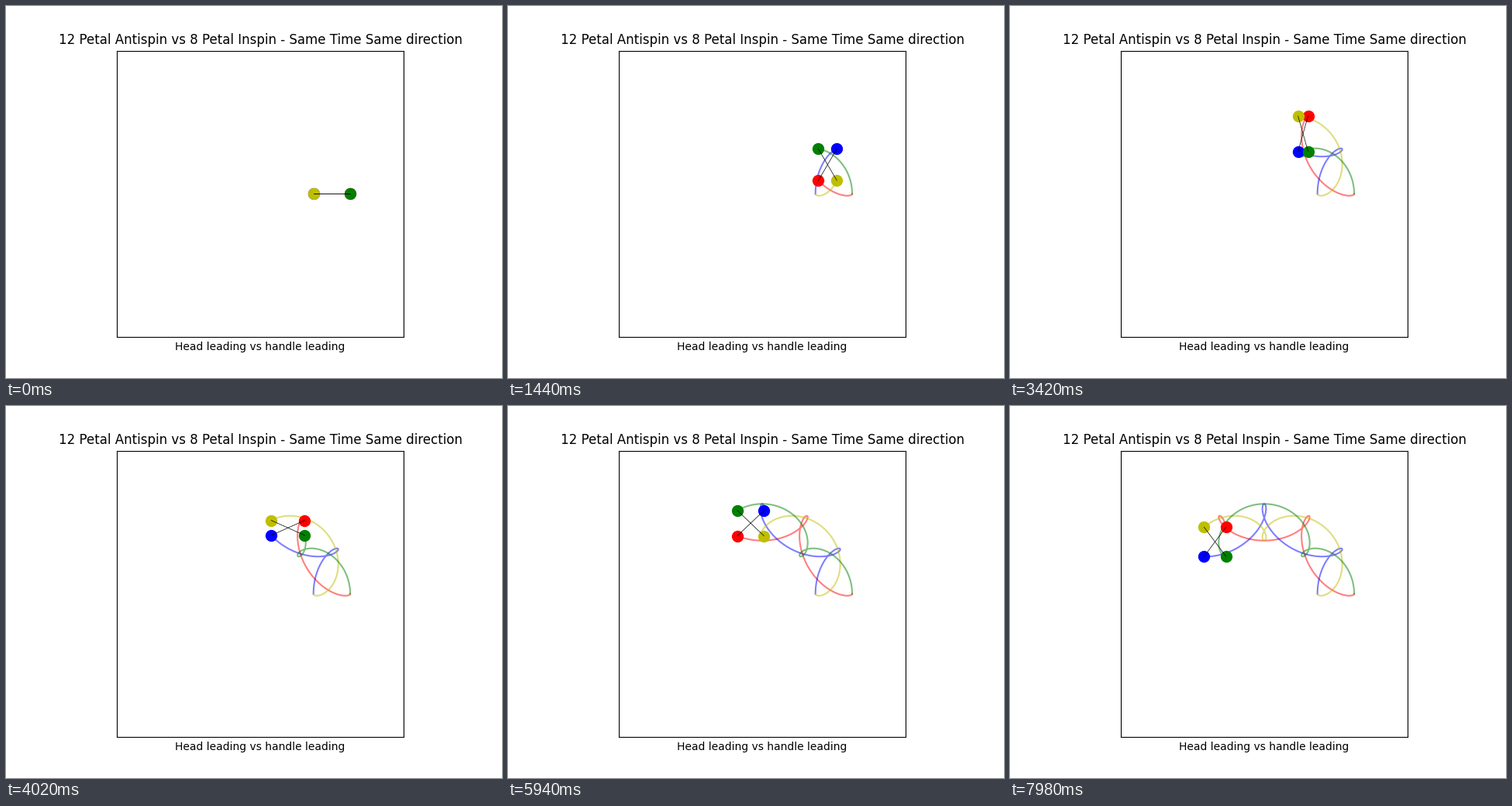
Animation, 640 px wide and 480 px high, one loop 8 s. Source, as a matplotlib script:

```python
import numpy as np
import matplotlib.pyplot as plt
from matplotlib.animation import FuncAnimation

ARM = 1.0        # radius of the path of each stick's centre
HALF = 0.2565    # half the length of a stick
SPIN = 5         # stick turns per turn of the arm
TICK = 20        # ms per drawn frame
HOLD = 3         # drawn frames per pose

theta = np.linspace(0, 2 * np.pi, 360)


def head(spin, side):
    """Path of one end of a stick turning at the given rate."""
    x = ARM * np.cos(theta) + side * HALF * np.cos(spin * theta)
    y = ARM * np.sin(theta) + side * HALF * np.sin(spin * theta)
    return x, y


heads = [
    ("r", head(-SPIN, 1)),
    ("b", head(-SPIN, -1)),
    ("y", head(SPIN, -1)),
    ("g", head(SPIN, 1)),
]
sticks = [(heads[0][1], heads[1][1]), (heads[2][1], heads[3][1])]

fig, ax = plt.subplots(figsize=(6.4, 4.8), dpi=100)
ax.set_aspect("equal")
ax.set_xlim(-2 * ARM, 2 * ARM)
ax.set_ylim(-2 * ARM, 2 * ARM)
ax.set_xticks([])
ax.set_yticks([])
ax.set_title("12 Petal Antispin vs 8 Petal Inspin - Same Time Same direction")
ax.set_xlabel("Head leading vs handle leading")

trails = [ax.plot([], [], color=c, lw=1.5, alpha=0.5, zorder=2)[0]
          for c, _ in heads]
dots = [ax.plot([], [], "o", color=c, ms=10, zorder=3)[0] for c, _ in heads]
rods = [ax.plot([], [], color="k", lw=0.5, zorder=4)[0] for _ in sticks]


def update(frame):
    i = frame // HOLD
    for trail, dot, (_, (x, y)) in zip(trails, dots, heads):
        trail.set_data(x[:i + 1], y[:i + 1])
        dot.set_data([x[i]], [y[i]])
    for rod, ((x0, y0), (x1, y1)) in zip(rods, sticks):
        rod.set_data([x0[i], x1[i]], [y0[i], y1[i]])
    return trails + dots + rods


anim = FuncAnimation(fig, update, frames=400, interval=TICK,
                     repeat=True, repeat_delay=0, blit=False)
plt.show()
```
